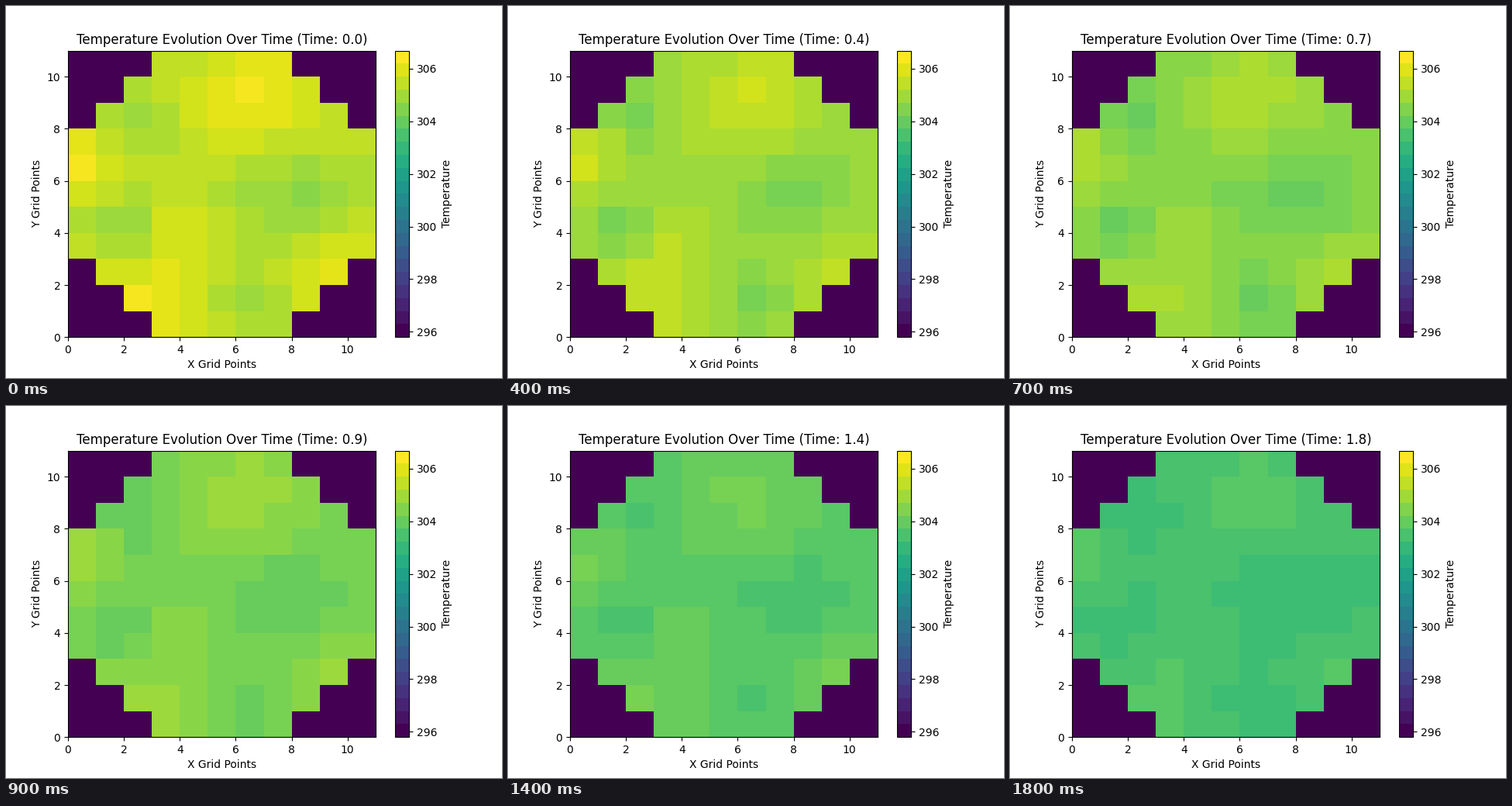
A matplotlib script that plays this animation: 640 by 480 pixels, repeating every 1.9 s.

```python
import numpy as np
import matplotlib.pyplot as plt
from matplotlib.animation import FuncAnimation
from matplotlib.cm import ScalarMappable
from matplotlib.colors import Normalize

SIZE = 11
FRAMES = 19
T_MIN, T_MAX = 295.796, 306.686
MEAN = 3.1

# Warm and cold spots at the start: x, y, strength, spread
SPOTS = [
    (5.7, 8.9, 3.2, 6.0),
    (2.0, 8.0, -2.2, 1.6),
    (0.0, 6.3, 3.4, 1.7),
    (1.4, 3.7, -2.8, 1.4),
    (3.5, 3.6, 2.0, 1.8),
    (2.0, 0.6, 3.0, 5.0),
    (7.6, 4.8, -2.5, 3.0),
    (6.1, 0.9, -2.0, 1.3),
    (8.9, 2.0, 2.7, 2.6),
    (4.8, 5.4, -0.8, 2.0),
    (4.6, 10.4, -1.0, 1.5),
]

y, x = np.mgrid[:SIZE, :SIZE]
outside = (x - 5) ** 2 + (y - 5) ** 2 > 30
start = 2.6 + sum(
    strength * np.exp(-((x - cx) ** 2 + (y - cy) ** 2) / spread)
    for cx, cy, strength, spread in SPOTS
)


def shades(t):
    """Colour map index of every cell at time t."""
    mean = MEAN - 4.3 * t + 0.14 * t**2
    heat = mean + (start - MEAN) * np.exp(-0.43 * t)
    index = np.clip(210 + 7 * np.round(heat), 0, 252)
    return np.where(outside, 0, index)


fig, ax = plt.subplots(figsize=(6.4, 4.8), dpi=100)
mesh = ax.pcolormesh(shades(0), cmap="viridis", vmin=0, vmax=256)
scale = ScalarMappable(Normalize(T_MIN, T_MAX),
                       plt.get_cmap("viridis").resampled(22))
fig.colorbar(scale, ax=ax, label="Temperature")
ax.set_xlabel("X Grid Points")
ax.set_ylabel("Y Grid Points")
title = ax.set_title("")


def update(i):
    t = i / 10
    mesh.set_array(shades(t))
    title.set_text(f"Temperature Evolution Over Time (Time: {t:.1f})")
    return mesh, title


anim = FuncAnimation(fig, update, frames=FRAMES, interval=100, repeat=True)
plt.show()
```
